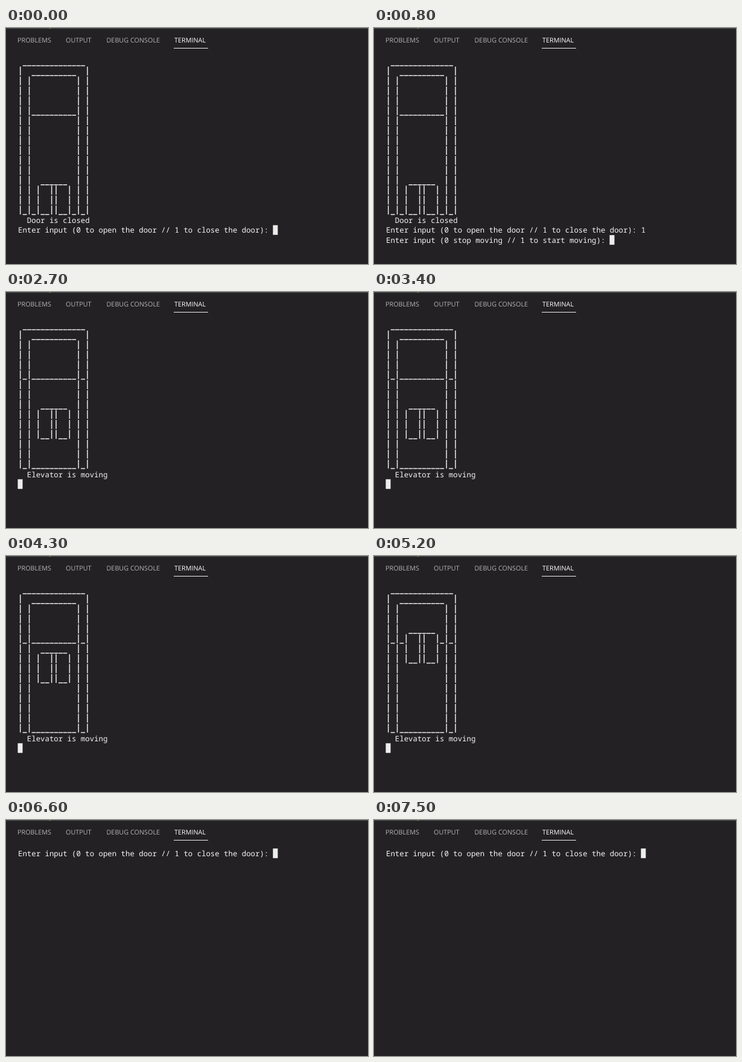
These frames come from a looping animation (600 by 391 pixels, 7.6 s). An HTML page:

```html
<!DOCTYPE html>
<html lang="en">
<head>
<meta charset="utf-8">
<title>Elevator terminal</title>
<style>
  html, body { margin: 0; width: 100%; height: 100%; overflow: hidden; background: #232124; }
  svg { display: block; width: 600px; height: 391px; }
  text { white-space: pre; text-rendering: geometricPrecision; }
  .tab { font: 500 10.8px "Open Sans", "Noto Sans", sans-serif; fill: #b4b3b4; }
  .active { fill: #fff; }
  .line { font: 500 12.37px "Noto Sans Mono", "DejaVu Sans Mono", monospace; fill: #f6f6f6; }
</style>
</head>
<body>
<svg viewBox="0 0 600 391">
  <rect width="600" height="391" fill="#232124"/>
  <rect width="600" height="1.3" fill="#4a494a"/>
  <rect x="72" width="2" height="1" fill="#b5a53c"/>
  <text class="tab" x="19" y="24">PROBLEMS</text>
  <text class="tab" x="99" y="24">OUTPUT</text>
  <text class="tab" x="166.5" y="24">DEBUG CONSOLE</text>
  <text class="tab active" x="279" y="24">TERMINAL</text>
  <rect x="278" y="33" width="57" height="1" fill="#f0f0f0"/>
  <path id="art" fill="none" stroke="#ececec" stroke-width="1.5"/>
  <g id="lines"></g>
  <rect id="cursor" width="8" height="16" fill="#ededed"/>
</svg>
<script>
const LOOP = 7600, LEFT = 20, TOP = 46.6, CHAR = 7.42, ROW = 16.44;
const art = document.getElementById('art');
const lines = document.getElementById('lines');
const cursor = document.getElementById('cursor');

const DOOR_PROMPT = 'Enter input (0 to open the door // 1 to close the door): ';
const MOVE_PROMPT = 'Enter input (0 stop moving // 1 to start moving): ';

// Writes the visible characters of `text` over a row.
function stamp(rows, row, col, text) {
  const chars = [...rows[row]];
  [...text].forEach((c, i) => { if (c !== ' ') chars[col + i] = c; });
  rows[row] = chars.join('');
}

function shaft({ height, carTop, open = false, parked = false }) {
  const wall = '| |          | |';
  const floor = '|_|__________|_|';
  const rows = [' ______________ ', '|  __________  |'];
  while (rows.length < height) rows.push(wall);
  rows[5] = parked ? '| |__________| |' : floor;
  rows[height - 1] = floor;

  const side = open ? '|      |' : '|  ||  |';
  const base = open ? '|______|' : '|__||__|';
  stamp(rows, carTop, 5, '______');
  for (let i = 1; i <= 3; i++) {
    const row = carTop + i;
    // The car covers the floor line behind it.
    rows[row] = rows[row].slice(0, 4) + ' '.repeat(8) + rows[row].slice(12);
    stamp(rows, row, 4, i === 3 ? base : side);
  }
  return rows;
}

const closed = shaft({ height: 16, carTop: 12, parked: true });
const waiting = (...prompts) => ({ rows: closed, text: ['  Door is closed', ...prompts] });
const moving = options => ({ rows: shaft(options), text: ['  Elevator is moving', ''] });

const scenes = [
  [0, waiting(DOOR_PROMPT)],
  [400, waiting(DOOR_PROMPT + '1')],
  [700, waiting(DOOR_PROMPT + '1', MOVE_PROMPT)],
  [1400, waiting(DOOR_PROMPT + '1', MOVE_PROMPT + '1')],
  [1700, waiting(DOOR_PROMPT + '1', MOVE_PROMPT + '1', '')],
  [2700, moving({ height: 15, carTop: 8 })],
  [3600, moving({ height: 15, carTop: 6 })],
  [4600, moving({ height: 15, carTop: 4 })],
  [5500, moving({ height: 16, carTop: 2, open: true })],
  [6500, { rows: [], text: [DOOR_PROMPT] }]
];

function artPath(rows) {
  let d = '';
  rows.forEach((row, r) => [...row].forEach((c, i) => {
    const x = LEFT + i * CHAR, y = TOP + r * ROW;
    if (c === '|') d += `M${x + CHAR / 2} ${y + 1}v14.8`;
    if (c === '_') d += `M${x + 0.3} ${y + 15.8}h${CHAR - 0.6}`;
  }));
  return d;
}

function show({ rows, text }) {
  art.setAttribute('d', artPath(rows));
  lines.replaceChildren(...text.map((content, i) => {
    const el = document.createElementNS('http://www.w3.org/2000/svg', 'text');
    el.setAttribute('class', 'line');
    el.setAttribute('x', LEFT);
    el.setAttribute('y', TOP + (rows.length + i) * ROW + 13.3);
    el.textContent = content;
    return el;
  }));
  cursor.setAttribute('x', LEFT - 0.5 + text.at(-1).length * CHAR);
  cursor.setAttribute('y', TOP + (rows.length + text.length - 1) * ROW + 0.6);
}

const start = performance.now();
let current;
function render(now) {
  const t = Math.max(0, now - start) % LOOP;
  const scene = scenes.findLast(([time]) => time <= t)[1];
  if (scene !== current) show(current = scene);
  requestAnimationFrame(render);
}
render(start);
</script>
</body>
</html>
```
